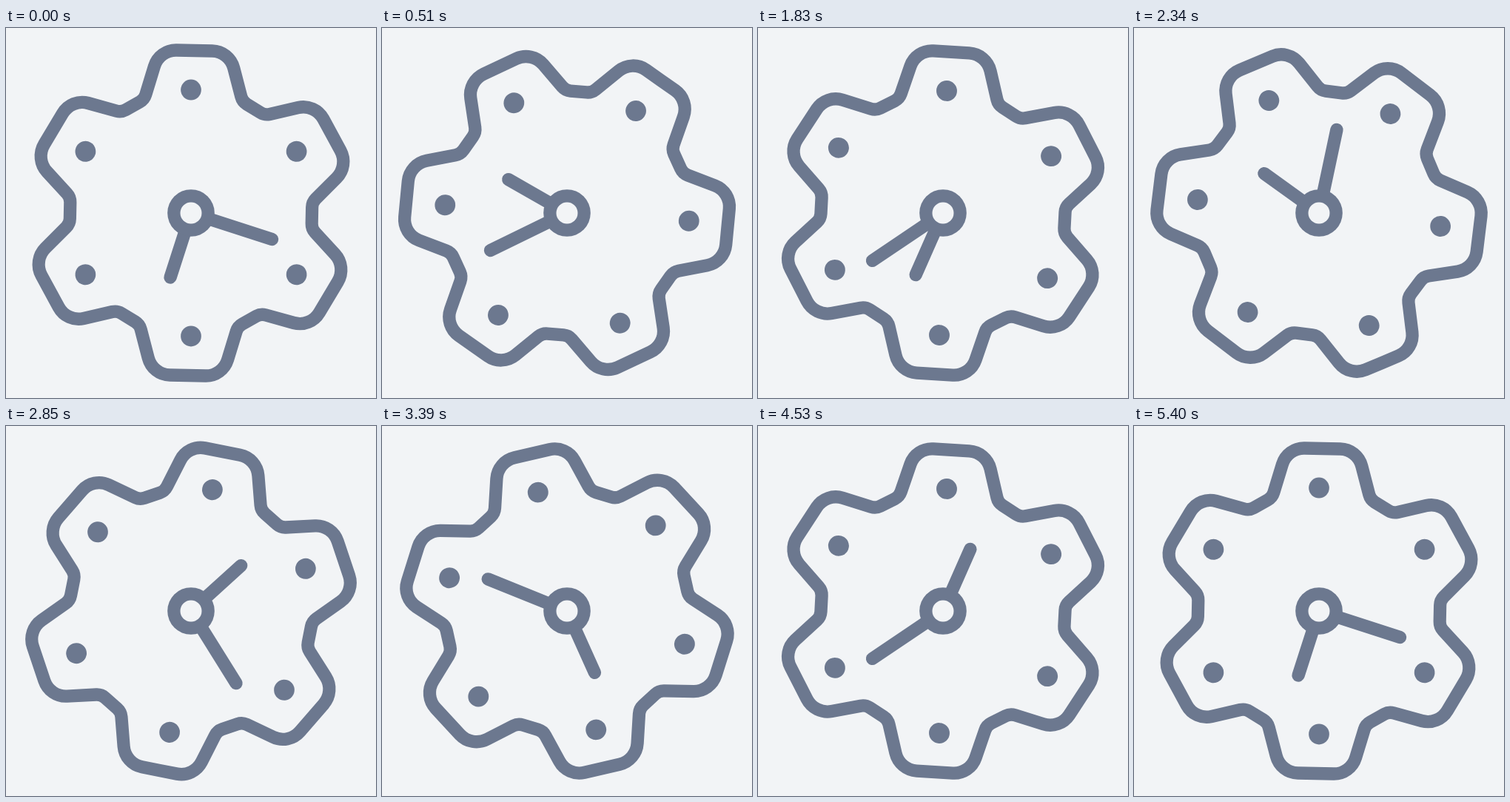
Recreate the animation shown at these times as an HTML page with a canvas. Size 500 px wide and 500 px high, loop 5430 ms.

```html
<!DOCTYPE html>
<html lang="en">
<head>
<meta charset="utf-8">
<title>Gear clock</title>
<style>
  html, body { margin: 0; width: 100%; height: 100%; overflow: hidden; background: #f2f4f6; }
  canvas { display: block; width: 500px; height: 500px; }
</style>
</head>
<body>
<canvas id="stage"></canvas>
<script>
const SIZE = 500, STEP = 30, LOOP = 5430;
const INK = '#6c788f', PAPER = '#f2f4f6';
const SQUEEZE = 0.9895; // the gear is slightly narrower than tall
const canvas = document.getElementById('stage');
const ctx = canvas.getContext('2d');
const ratio = window.devicePixelRatio || 1;
canvas.width = canvas.height = SIZE * ratio;

const rad = deg => deg * Math.PI / 180;

// One tooth, pointing up: x, y, corner radius
const TOOTH = [
  [-67.1, -152, 17],
  [-47.8, -219.6, 31],
  [47.8, -219.6, 31],
  [67.1, -152, 17]
];

function buildGear() {
  const corners = [];
  for (let k = 0; k < 6; k++) {
    const c = Math.cos(rad(60 * k + 1.2)), s = Math.sin(rad(60 * k + 1.2));
    for (const [x, y, r] of TOOTH) corners.push([x * c - y * s, x * s + y * c, r]);
  }
  const path = new Path2D();
  const n = corners.length, [a, b] = [corners[1], corners[2]];
  path.moveTo((a[0] + b[0]) / 2, (a[1] + b[1]) / 2);
  for (let i = 2; i < n + 2; i++) {
    const [x, y, r] = corners[i % n], next = corners[(i + 1) % n];
    path.arcTo(x, y, next[0], next[1], r);
  }
  path.closePath();
  return path;
}

const gear = buildGear();

function disc(x, y, r, color) {
  ctx.fillStyle = color;
  ctx.beginPath();
  ctx.arc(x, y, r, 0, 2 * Math.PI);
  ctx.fill();
}

function turned(deg, draw) {
  ctx.save();
  ctx.rotate(rad(deg));
  draw();
  ctx.restore();
}

function hand(deg, length) {
  turned(deg, () => {
    ctx.beginPath();
    ctx.moveTo(0, -20);
    ctx.lineTo(0, -length);
    ctx.stroke();
  });
}

function render(time) {
  const step = Math.floor((time % LOOP) / STEP);
  ctx.setTransform(ratio, 0, 0, ratio, 0, 0);
  ctx.fillStyle = PAPER;
  ctx.fillRect(0, 0, SIZE, SIZE);
  ctx.translate(SIZE / 2, SIZE / 2);
  ctx.strokeStyle = INK;
  ctx.lineWidth = 17.4;
  ctx.lineCap = 'round';

  turned(step * 2, () => {
    ctx.scale(SQUEEZE, 1);
    ctx.stroke(gear);
    for (let k = 0; k < 6; k++) turned(60 * k, () => disc(0, -166.4, 14, INK));
  });
  hand(108 + step * 8, 115.1);
  hand(197.8 + step * 6, 91.3);
  disc(0, 0, 31.8, INK);
  disc(0, 0, 14.5, PAPER);
}

const start = performance.now();
function tick() {
  render(performance.now() - start);
  requestAnimationFrame(tick);
}
tick();
</script>
</body>
</html>
```
